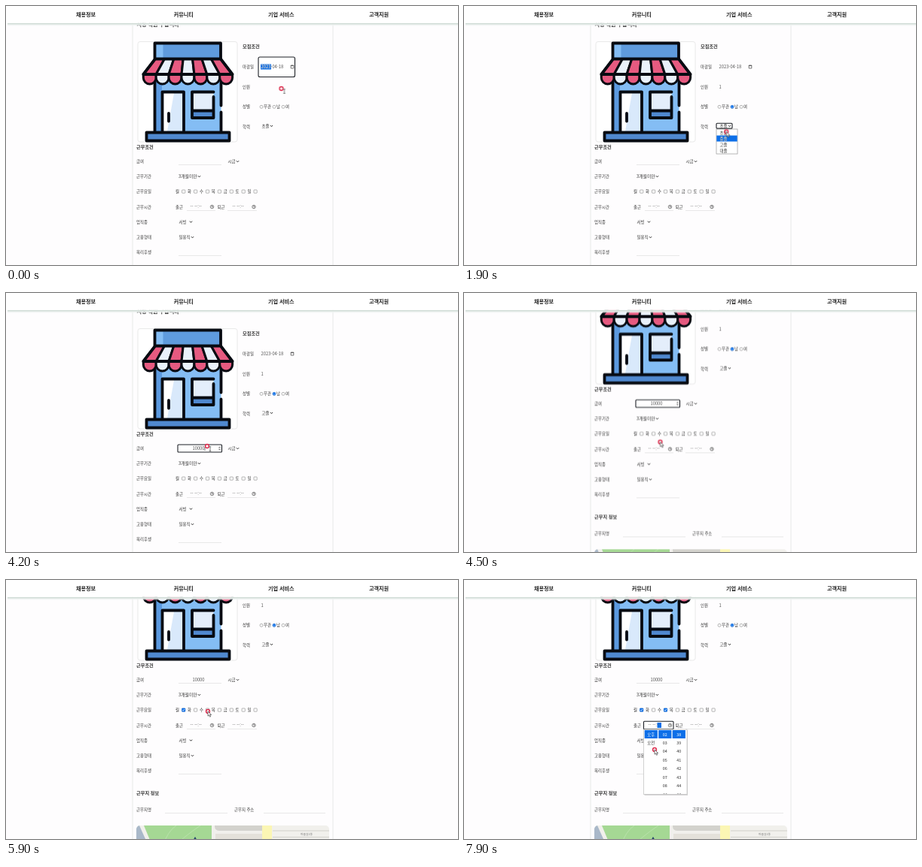
Animation of 600 by 345 pixels, one loop 8 s. Source, as an HTML page:

```html
<!DOCTYPE html>
<html lang="ko">
<head>
<meta charset="utf-8">
<title>채용 공고 작성</title>
<style>
html, body { margin: 0; width: 100%; height: 100%; overflow: hidden; background: #fefdfe; }
svg { display: block; width: 600px; height: 345px; }
text { font: 5.4px "Noto Sans CJK KR", "Noto Sans CJK", "Noto Sans", sans-serif; fill: #333; }
.nav { font-size: 7.1px; font-weight: 700; fill: #222; }
.head { font-size: 6.2px; font-weight: 700; fill: #333; }
.val { font-size: 5.8px; fill: #555; }
.mid { text-anchor: middle; }
.white { fill: #fff; }
.line { stroke: #dedede; stroke-width: .7; }
.focus { fill: #fff; stroke: #1d2026; stroke-width: 1.1; }
.box { fill: #fff; stroke: #858585; stroke-width: .6; }
.blue { fill: #0d6fe8; }
.ink { fill: none; stroke: #070b12; stroke-width: 3.8; stroke-linejoin: round; stroke-linecap: round; }
.icon { fill: none; stroke: #333; stroke-width: .65; }
#page { animation: scroll 8s infinite; }
#cursor { animation: move 8s ease-in-out infinite; }
@keyframes scroll {
  0%, 54.5% { transform: translateY(0); }
  58%, 100% { transform: translateY(-74px); }
}
@keyframes move {
  0% { transform: translate(365.5px, 110px); }
  3.5%, 10% { transform: translate(365px, 109px); }
  13.2%, 15.6% { transform: translate(355.5px, 135px); }
  20%, 21.9% { transform: translate(350px, 159px); }
  26.5%, 28.8% { transform: translate(345px, 184px); }
  33%, 36.5% { transform: translate(259px, 205px); }
  39%, 54% { transform: translate(267px, 204px); }
  58.5%, 60% { transform: translate(254px, 193px); }
  65%, 67% { transform: translate(236px, 174px); }
  72.5%, 75.6% { transform: translate(268px, 175px); }
  82.5%, 86.5% { transform: translate(273px, 194px); }
  98%, 100% { transform: translate(253px, 226px); }
}
</style>
</head>
<body>
<svg viewBox="0 0 600 345">
  <defs>
    <linearGradient id="shade" x2="0" y2="1">
      <stop stop-color="#b9c9c1"/><stop offset=".4" stop-color="#e4ebe8"/><stop offset="1" stop-color="#fefefe" stop-opacity="0"/>
    </linearGradient>
    <clipPath id="mapClip"><rect x="173" y="401" width="256" height="60" rx="5"/></clipPath>
    <path id="chev" d="M-1.6-.8 0 .8 1.6-.8" fill="none" stroke="#222" stroke-width="1"/>
    <path id="spin" d="M-1.5-.8 0-2.4 1.5-.8ZM-1.5.8 0 2.4 1.5.8Z" fill="#666"/>
    <g id="clock" class="icon"><circle r="2.2"/><path d="M0-1.4V.2H1.2"/></g>
  </defs>

  <g id="page">
    <path d="M168 0V430M434 0V430" stroke="#e6e7e7" stroke-width=".9"/>
    <text class="nav" x="173.500" y="27">서빙 직원 구합니다</text>

    <rect x="175" y="47.500" width="132" height="133.500" rx="3" fill="#fff" stroke="#e4e4e4" stroke-width=".8"/>
    <g id="shop">
      <rect x="197" y="90" width="88.500" height="78" fill="#84bdf4"/>
      <rect x="197" y="90" width="10" height="78" fill="#5c9ae0"/>
      <rect x="197.500" y="49.500" width="87.500" height="24" fill="#5f9bdd"/>
      <rect x="197.500" y="49.500" width="11" height="24" fill="#84bdf4"/>
      <path class="ink" d="M197.500 100V168M285.500 100V132.500M285.500 141.500V168M197.500 70V49.500H285V70"/>
      <rect x="207.500" y="114.500" width="28.500" height="54" fill="#d9e9fb"/>
      <path d="M209 116H223L214 167H209Z" fill="#fff"/>
      <path class="ink" d="M207.500 168V114.500H236V168M216 143V153.500"/>
      <rect x="247" y="114.500" width="28.500" height="34.500" fill="#e4eefb"/>
      <rect x="247" y="139.500" width="28.500" height="9.500" fill="#4f88cf"/>
      <path class="ink" d="M275.500 121V149H247V114.500H275.500M247 139.500H275"/>
      <rect class="ink" x="186.500" y="168.500" width="110" height="11" style="fill:#5089d0"/>
      <g id="awning"></g>
    </g>

    <text class="head" x="314" y="56">모집조건</text>
    <text x="314" y="83">마감일</text>
    <text x="314" y="109.500">인원</text>
    <text x="314" y="136">성별</text>
    <text x="314" y="162.500">학력</text>

    <g data-on="0 300">
      <rect class="focus" x="335" y="68" width="48.500" height="26.500" rx="2"/>
      <rect class="blue" x="338" y="77.500" width="14" height="7"/>
    </g>
    <text class="val" x="338.500" y="83.200">2023-04-18</text>
    <text class="val white" x="338.500" y="83.200" data-on="0 300" style="fill:#fff">2023</text>
    <path class="icon" d="M378.200 79H381.800V83H378.200ZM378.200 79.500H381.800"/>

    <g data-on="300 1200">
      <rect class="focus" x="335" y="94.500" width="61" height="26.500" rx="2"/>
      <path d="M342.300 104.500V109.800" stroke="#444" stroke-width=".6" data-on="700 1200"/>
    </g>
    <text class="val" x="338.500" y="109.500" data-on="700 8000">1</text>

    <circle class="box" cx="339" cy="134.300" r="2"/><text x="342" y="136.200">무관</text>
    <circle class="box" cx="356" cy="134.300" r="2"/><text x="359" y="136.200">남</text>
    <circle class="box" cx="368" cy="134.300" r="2"/><text x="371" y="136.200">여</text>
    <g data-on="1200 8000">
      <circle cx="356" cy="134.300" r="2" fill="#fff" stroke="#0d6fe8" stroke-width=".8"/>
      <circle class="blue" cx="356" cy="134.300" r="1.400"/>
    </g>

    <rect class="focus" x="335" y="156.300" width="21" height="6.800" rx="1" data-on="1700 2900"/>
    <text x="339.500" y="162" data-on="0 2300">초졸</text>
    <text x="339.500" y="162" data-on="2300 8000">고졸</text>
    <use href="#chev" x="352.500" y="159.800"/>

    <text class="head" x="173" y="190.200">근무조건</text>
    <text x="173" y="209">급여</text>
    <text x="173" y="229">근무기간</text>
    <text x="173" y="249">근무요일</text>
    <text x="173" y="269.500">근무시간</text>
    <text x="173" y="289.500">업직종</text>
    <text x="173" y="310">고용형태</text>
    <text x="173" y="330">복리후생</text>

    <path class="line" d="M229 211.500H286M240 272.500H278M294 272.500H333M229 332.500H286"/>
    <rect class="focus" x="228" y="202" width="58.500" height="10" rx="1" data-on="2900 5300"/>
    <use href="#spin" x="283.500" y="207" data-on="2600 5300"/>
    <g id="pay"></g>
    <path d="M264 204.500V210" stroke="#222" stroke-width=".6" data-on="3900 4400"/>

    <text x="294.500" y="209">시급</text><use href="#chev" x="307.500" y="207"/>
    <text style="font-size:5.8px" x="229" y="229">3개월미만</text><use href="#chev" x="256.500" y="227"/>
    <g id="days"></g>

    <text x="225" y="269.500">출근</text>
    <text x="280.500" y="269.500">퇴근</text>
    <rect class="focus" x="238.500" y="262.200" width="39.500" height="10.600" rx="1" data-on="6800 8000"/>
    <rect class="blue" x="256.500" y="264" width="5.500" height="7" data-on="6800 8000"/>
    <text class="val" x="244.500" y="269.200">-- --:--</text>
    <text class="val" x="300.500" y="269.200">-- --:--</text>
    <use href="#clock" x="273.500" y="267.500"/>
    <use href="#clock" x="329" y="267.500"/>

    <text x="229.500" y="289.500">서빙</text><use href="#chev" x="245.500" y="287.500"/>
    <text x="229.500" y="310">일용직</text><use href="#chev" x="247.500" y="308"/>

    <text class="head" x="173" y="360.200">근무지 정보</text>
    <text x="173" y="382">근무지명</text>
    <text x="303" y="382">근무지 주소</text>
    <path class="line" d="M211 384.500H294M342 384.500H424"/>

    <g clip-path="url(#mapClip)">
      <rect x="173" y="401" width="256" height="60" fill="#f1f0ec"/>
      <path d="M173 401H177L190 430H173Z" fill="#a9b8c9"/>
      <path d="M183 401H273V430H195Z" fill="#a5d894"/>
      <path d="M207 430Q215 408 226 401M222 430Q236 416 258 401" fill="none" stroke="#b9e2ab"/>
      <path d="M248 421 251 416 254 421Z" fill="#23456a"/>
      <path d="M277 401H340V408H284Q277 408 277 402Z" fill="#d3d2cd"/>
      <path d="M278 412H340V430H278Z" fill="#e4e1da"/>
      <rect x="340" y="401" width="13" height="30" fill="#fbf6b4"/>
      <path d="M354 408H429M354 416.500H429" stroke="#d2d1cc" stroke-width="1.200"/>
      <text x="391" y="413.800" style="font-size:3.8px;fill:#777">마을길1동</text>
    </g>

    <g id="schools" data-on="1700 2300">
      <rect x="335" y="164" width="28" height="33" fill="#fff" stroke="#888" stroke-width=".6"/>
    </g>
    <g id="picker" data-on="6800 8000">
      <rect x="239.500" y="274" width="57.500" height="87" fill="#000" opacity=".16"/>
      <rect x="238.500" y="273" width="57.500" height="86.500" fill="#fff" stroke="#b5b5b5" stroke-width=".6"/>
    </g>
  </g>

  <rect y="22.500" x="2" width="598" height="5" fill="url(#shade)"/>
  <rect width="600" height="22.800" fill="#fff"/>
  <g class="mid">
    <text class="nav" x="106" y="14.300">채용정보</text>
    <text class="nav" x="235.700" y="14.300">커뮤니티</text>
    <text class="nav" x="365.300" y="14.300">기업 서비스</text>
    <text class="nav" x="495" y="14.300">고객지원</text>
  </g>

  <g id="cursor">
    <circle r="2.400" fill="#fff" fill-opacity=".6" stroke="#dd2f50" stroke-width="1.500"/>
    <path id="beam" d="M2.700.800H5.300M4 .800V6.400M2.700 6.400H5.300" fill="none" stroke="#444" stroke-width=".7"/>
    <path id="arrow" d="M0 0V6.200L1.500 4.900 2.600 7.300 3.700 6.800 2.700 4.500H4.600Z" fill="#fff" stroke="#222" stroke-width=".6"/>
  </g>
</svg>
<script>
const LOOP = 8000;
const get = id => document.getElementById(id);
const add = (id, markup) => get(id).insertAdjacentHTML('beforeend', markup);

// Awning: seven tapered stripes ending in scallops
for (let i = 0; i < 7; i++) {
  const top = n => 198 + n * 12.4, low = n => 182.3 + n * 16.9;
  const fill = i % 2 ? '#e9f1fb' : '#e65a80';
  add('awning', `<path class="ink" style="fill:${fill};stroke-width:3" d="M${top(i)} 70.5H${top(i + 1)}
    L${low(i + 1)} 91V95.500A8.45 8.45 0 0 1 ${low(i)} 95.500V91Z"/>`);
}
add('awning', '<path class="ink" d="M198 70.500H285L300.600 91H182.300Z"/>');

// Salary typing
const keys = [3200, 3600, 3700, 3800, 3900, LOOP];
for (let i = 0; i < 5; i++)
  add('pay', `<text class="val mid" x="255.500" y="209" data-on="${keys[i]} ${keys[i + 1]}">${'10000'.slice(0, i + 1)}</text>`);

// Weekday checkboxes
const ticked = { 월: 5300, 수: 6000 };
[...'월화수목금토일'].forEach((day, i) => {
  const x = 235.6 + i * 15.9;
  add('days', `<text class="mid" x="${x - 8}" y="249">${day}</text>
    <rect class="box" x="${x - 2}" y="245" width="4.200" height="4.200" rx=".5"/>`);
  if (ticked[day]) add('days', `<g data-on="${ticked[day]} ${LOOP}">
    <rect class="blue" x="${x - 2.3}" y="244.700" width="4.800" height="4.800" rx=".7"/>
    <path d="M${x - 1.3} 247.100l1 1.100 1.800-2.200" fill="none" stroke="#fff" stroke-width=".8"/></g>`);
});

// Education list with moving highlight
const hover = [1700, 1900, 2050, 2300];
['초졸', '중졸', '고졸', '대졸'].forEach((name, i) => {
  const y = 164.5 + i * 8;
  if (i < 3) add('schools', `<rect class="blue" x="335.300" y="${y}" width="27.400" height="8" data-on="${hover[i]} ${hover[i + 1]}"/>`);
  add('schools', `<text x="339.500" y="${y + 6}">${name}</text>`);
  if (i < 3) add('schools', `<text class="white" x="339.500" y="${y + 6}" data-on="${hover[i]} ${hover[i + 1]}">${name}</text>`);
});

// Time picker columns
const pad = n => String(n).padStart(2, '0');
for (let col = 0; col < 3; col++) {
  const x = 248.3 + col * 18.5;
  add('picker', `<rect class="blue" x="${x - 8.6}" y="274" width="17.200" height="11"/>`);
  for (let row = 0; row < (col ? 7 : 2); row++) {
    const label = [['오후', '오전'][row], pad(2 + row), 38 + row][col];
    add('picker', `<text class="mid ${row ? '' : 'white'}" x="${x}" y="${281.5 + row * 11.4}">${label}</text>`);
  }
  if (col) add('picker', `<path d="M${x - 2} 358.500h1.500m1.500 0h1.500" stroke="#777" stroke-width=".7"/>`);
}

// Turn each list of on/off times into stepped keyframes
get('beam').dataset.on = '0 950 2550 4400';
get('arrow').dataset.on = '950 2550 4400 8000';
let css = '';
document.querySelectorAll('[data-on]').forEach((el, i) => {
  const steps = el.dataset.on.split(' ').map((ms, n) =>
    ms < LOOP ? `${ms * 100 / LOOP}%{opacity:${n % 2 ? 0 : 1}}` : '');
  css += `@keyframes on${i}{0%{opacity:0}${steps.join('')}}`;
  el.style.animation = `on${i} ${LOOP}ms step-end infinite`;
});
document.head.insertAdjacentHTML('beforeend', `<style>${css}</style>`);
</script>
</body>
</html>
```
